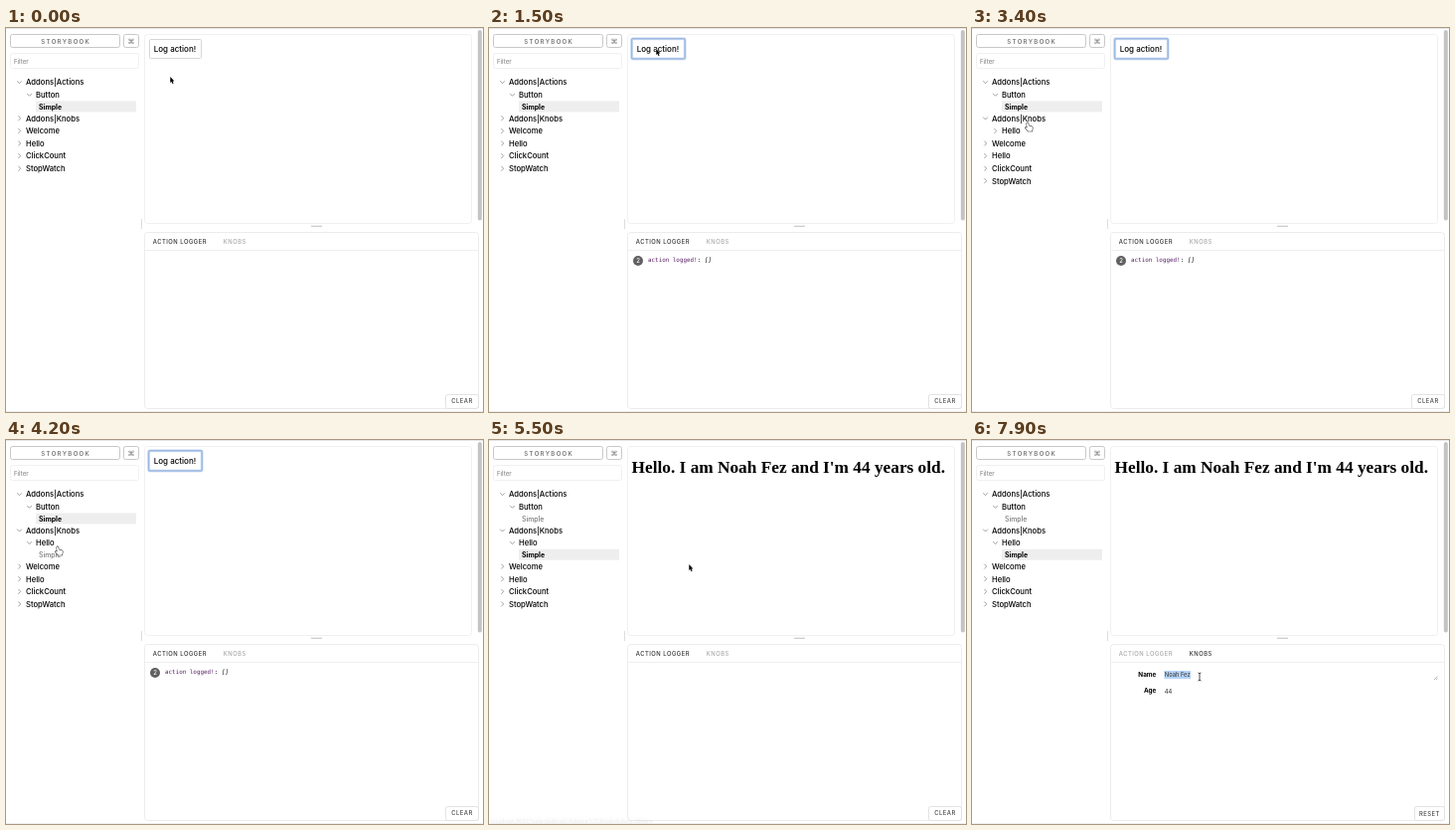
Animation of 480x386 px, one loop 8000 ms. Source, as an HTML page with a canvas:

```html
<!DOCTYPE html>
<html lang="en">
<head>
<meta charset="utf-8">
<title>Component explorer</title>
<style>
  html, body { margin: 0; width: 100%; height: 100%; overflow: hidden; background: #fff; }
  canvas { display: block; }
</style>
</head>
<body>
<canvas id="stage" width="480" height="386"></canvas>
<script>
const ctx = document.getElementById('stage').getContext('2d');
const LOOP = 8000, STEP = 100;
const SANS = 'Inter, sans-serif', SERIF = '"Liberation Serif", serif', MONO = '"DejaVu Sans Mono", monospace';
const PERSON = 'Noah Fez';

const clamp = v => Math.max(0, Math.min(1, v));
const mix = (a, b, k) => a + (b - a) * k;

function text(str, x, y, size, { color = '#000', weight = 500, family = SANS, spacing = 0, align = 'left', style = '' } = {}) {
  ctx.font = `${style} ${weight} ${size}px ${family}`;
  ctx.letterSpacing = spacing + 'px';
  ctx.textAlign = align;
  ctx.fillStyle = color;
  ctx.fillText(str, x, y);
}

function rect(x, y, w, h, color) {
  ctx.fillStyle = color;
  ctx.fillRect(x, y, w, h);
}

function frame(x, y, w, h, color, radius = 2, width = 1) {
  ctx.beginPath();
  ctx.roundRect(x, y, w, h, radius);
  ctx.strokeStyle = color;
  ctx.lineWidth = width;
  ctx.stroke();
}

function line(points, color, width = 0.8) {
  ctx.beginPath();
  points.forEach(([x, y]) => ctx.lineTo(x, y));
  ctx.strokeStyle = color;
  ctx.lineWidth = width;
  ctx.stroke();
}

function focusRing(x, y, w, h) {
  frame(x, y, w, h, '#d8e4f5', 1.5, 3);
  frame(x, y, w, h, '#9bb9e3', 1, 1.5);
}

function chevron(x, y, open) {
  ctx.save();
  ctx.translate(x, y);
  ctx.rotate(open * Math.PI / 2);
  line([[-1.2, -2.4], [1.2, 0], [-1.2, 2.4]], '#888');
  ctx.restore();
}

function drawChrome() {
  rect(0, 0, 480, 386, '#fff');
  rect(0, 0, 480, 1, '#e6e6e6');
  rect(0, 385, 480, 1, '#f0f0f0');
  frame(4.5, 6.5, 110, 13, '#c8c8c8');
  text('STORYBOOK', 35.3, 15.6, 6, { color: '#777', weight: 600, spacing: 1.35 });
  frame(118.5, 6.5, 15, 13, '#c8c8c8');
  text('⌘', 126, 15.9, 7, { color: '#777', align: 'center', family: '"DejaVu Sans", sans-serif' });
  frame(4.5, 25.5, 129, 15, '#f0f0f0');
  text('Filter', 8, 35.7, 6, { color: '#8c8c8c' });
  frame(139.5, 6.5, 329, 190, '#f0f0f0', 3);
  frame(139.5, 205.5, 336, 177, '#ececec', 3);
  rect(140, 223, 335, 1, '#efefef');
  rect(307, 198.6, 11, 1.4, '#cfcfcf');
  rect(136, 192, 1, 10, '#dedede');
  ctx.beginPath();
  ctx.roundRect(474.8, 2, 4, 191.5, 2);
  ctx.fillStyle = '#c3c3c3';
  ctx.fill();
}

function drawTree(t) {
  const knobsOpen = clamp((t - 3000) / 200), helloOpen = clamp((t - 3700) / 400);
  const second = t >= 4600;
  let top = 48.2;

  function folder(label, depth, open = 0, show = 1) {
    ctx.globalAlpha = show;
    const y = top + 6.3;
    chevron(13.5 + depth * 10, y, open);
    text(label, 20 + depth * 10, y + 2.8, 7.65);
    top += 12.6 * show;
    ctx.globalAlpha = 1;
  }
  function leaf(label, selected, show = 1) {
    ctx.globalAlpha = show;
    if (selected) rect(30, top, 101, 11, '#eee');
    text(label, 33, top + 8.1, 6.9, selected ? { weight: 700 } : { color: '#777' });
    top += 11.1 * show;
    ctx.globalAlpha = 1;
  }

  folder('Addons|Actions', 0, 1);
  folder('Button', 1, 1);
  leaf('Simple', !second);
  folder('Addons|Knobs', 0, knobsOpen);
  if (knobsOpen) folder('Hello', 1, helloOpen, knobsOpen);
  if (helloOpen) leaf('Simple', second, helloOpen);
  ['Welcome', 'Hello', 'ClickCount', 'StopWatch'].forEach(name => folder(name, 0));
}

function drawPreview(t) {
  if (t < 4700) {
    frame(144.5, 11.5, 52, 19, '#d6d6d6', 1);
    if (t >= 700) focusRing(143.6, 10.8, 53.6, 20.2);
    text('Log action!', 148.7, 23.8, 8);
  } else if (t >= 5000) {
    text(`Hello. I am ${PERSON} and I'm 44 years old.`, 143.6, 33.4, 17.3, { weight: 700, family: SERIF });
  }
}

function drawLog(t) {
  if (t < 800 || t >= 4700) return;
  const repeated = t >= 1400;
  const x = repeated ? 160 : 145;
  if (repeated) {
    ctx.beginPath();
    ctx.arc(150, 234, 5, 0, 7);
    ctx.fillStyle = '#606060';
    ctx.fill();
    text('2', 150, 236.2, 6, { color: '#fff', align: 'center' });
  }
  const mono = { family: MONO, weight: 400 };
  text('action logged!', x, 235.2, 5.9, { ...mono, color: '#561c62' });
  text(':', x + 49.7, 235.2, 5.9, mono);
  text('[]', x + 57, 235.2, 5.9, { ...mono, style: 'italic' });
}

function drawKnobs(t) {
  const label = { weight: 700, align: 'right' }, value = { color: '#444' };
  if (t >= 7900) rect(193.5, 232, 26.5, 8, '#b4d3f8');
  text('Name', 185.3, 237.8, 6.3, label);
  text(PERSON, 193.8, 238, 5.75, value);
  text('Age', 185.3, 254.3, 6.3, label);
  text('44', 193.8, 254.6, 5.75, value);
  line([[465, 241], [468.5, 237.5]], '#999', 0.7);
  line([[467, 241], [468.5, 239.5]], '#999', 0.7);
  if (t >= 7100 && t < 7600) rect(220, 232, 0.8, 8, '#222');
}

function drawPanel(t) {
  const knobs = t >= 6300;
  const tab = active => ({ color: active ? '#333' : '#a8a8a8', spacing: 0.5 });
  text('ACTION LOGGER', 147.7, 216.6, 5.85, tab(!knobs));
  text('KNOBS', 218.8, 216.6, 5.85, tab(knobs));
  const left = knobs ? 445.5 : 442.5;
  frame(left, 368.5, 475.5 - left, 14, '#e2e2e2');
  text(knobs ? 'RESET' : 'CLEAR', knobs ? 450 : 448.2, knobs ? 377.8 : 377.2, 5.85, { color: '#444', spacing: 0.5 });
  if (knobs) drawKnobs(t); else drawLog(t);
  if (t >= 6200 && t < 7000) {
    // the panel clips the upper edge of the ring
    ctx.save();
    ctx.beginPath();
    ctx.rect(139, 205, 337, 178);
    ctx.clip();
    focusRing(209.8, 204.8, 41.2, 18.6);
    ctx.restore();
  }
}

// Browser status bubble for the hovered link
function drawStatus(t) {
  const pulse = (start, end) => Math.min(clamp((t - start) / 200), clamp((end - t) / 300));
  const alpha = Math.max(pulse(2200, 2900), pulse(4400, 5300), t >= 5300 && t < 5800 ? 0.12 : 0);
  if (!alpha) return;
  ctx.globalAlpha = alpha;
  rect(0, 379, 160, 7, '#ececec');
  text('localhost:9001/?selectedKind=Addons%7CKnobs&story=Simple', 2, 384.6, 5.3, { color: '#777' });
  ctx.globalAlpha = 1;
}

// time, x, y of the pointer's hot spot
const PATH = [
  [0, 165, 49], [500, 168, 21], [1800, 168, 21], [1900, 128, 42], [2000, 73, 67], [2100, 73, 67],
  [2500, 66, 77], [3000, 57, 89], [3300, 57, 89], [3400, 55, 95], [3600, 51, 107], [4300, 51, 107],
  [4600, 46, 112], [4900, 46, 112], [5200, 110, 119], [5500, 201, 125], [5800, 224, 199],
  [6100, 229, 212], [6300, 229, 212], [6600, 221, 231], [6700, 222, 233], [6900, 249, 242],
  [7200, 229, 238], [LOOP, 229, 238]
];

function shape(points, fill, stroke, width) {
  ctx.beginPath();
  points.forEach(([x, y]) => ctx.lineTo(x, y));
  ctx.closePath();
  ctx.lineJoin = 'round';
  ctx.strokeStyle = stroke;
  ctx.lineWidth = width;
  ctx.stroke();
  ctx.fillStyle = fill;
  ctx.fill();
}

const pointers = {
  arrow() {
    shape([[0.3, 0], [0.3, 6], [1.6, 4.9], [2.6, 7.2], [3.6, 6.8], [2.6, 4.6], [4.4, 4.4]], '#000', '#fff', 0.8);
  },
  hand() {
    shape([[0, 0.8], [0.8, 0], [1.6, 0.8], [2, 3.2], [5.2, 4], [6, 5], [5.4, 8.8], [1.6, 8.8], [-1.4, 5.4], [-0.6, 4.7], [0.5, 5.6]],
      '#fff', '#222', 1.1);
  },
  beam() {
    line([[-1.5, -4], [0, -3.3], [1.5, -4]], '#222');
    line([[0, -3.3], [0, 3.3]], '#222');
    line([[-1.5, 4], [0, 3.3], [1.5, 4]], '#222');
  }
};

function drawPointer(t) {
  const i = PATH.findIndex(p => p[0] > t);
  const [t0, x0, y0] = PATH[i - 1], [t1, x1, y1] = PATH[i];
  const k = (t - t0) / (t1 - t0);
  const kind = t >= 6500 ? 'beam' : (t >= 2000 && t < 5000) || t >= 6000 ? 'hand' : 'arrow';
  ctx.save();
  ctx.translate(mix(x0, x1, k), mix(y0, y1, k));
  pointers[kind]();
  ctx.restore();
}

function render() {
  const t = Math.floor(performance.now() % LOOP / STEP) * STEP;
  drawChrome();
  drawTree(t);
  drawPreview(t);
  drawPanel(t);
  drawStatus(t);
  drawPointer(t);
  requestAnimationFrame(render);
}
render();
</script>
</body>
</html>
```
